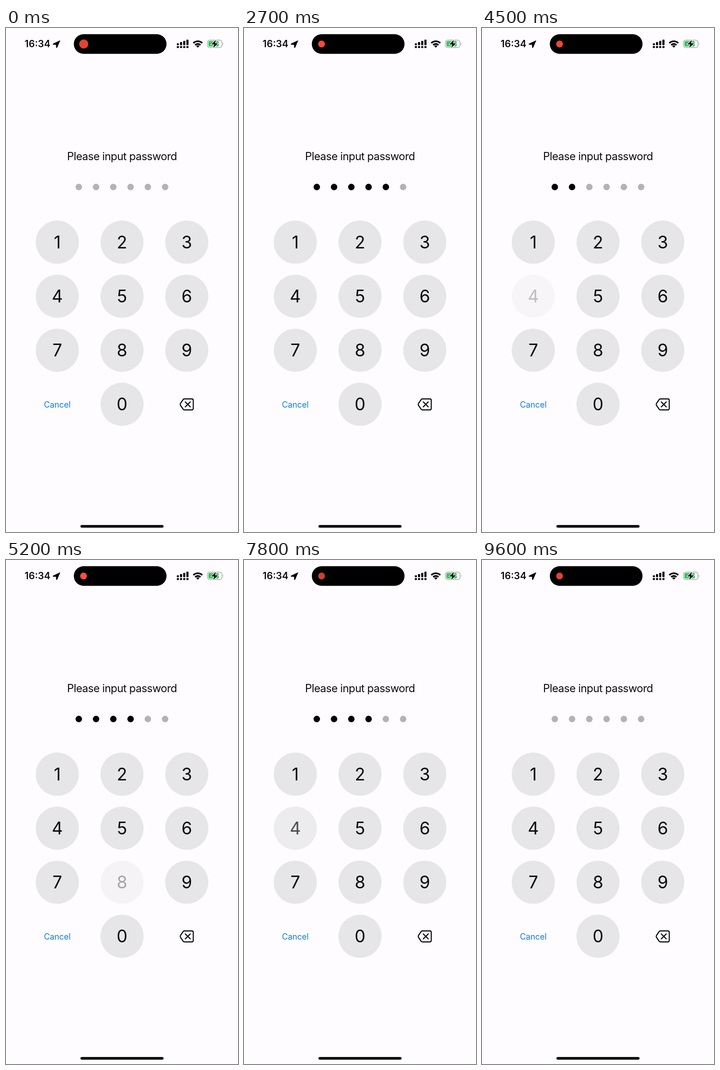
These frames come from a looping animation (508x1102 px, 9.7 s). An HTML page:

```html
<!DOCTYPE html>
<html lang="en">
<head>
<meta charset="utf-8">
<title>Password keypad</title>
<style>
  html, body { margin: 0; width: 100%; height: 100%; overflow: hidden; background: #fefcff; }
  svg { display: block; width: 508px; height: 1102px; }
  text { font-family: Inter, Roboto, sans-serif; text-anchor: middle; fill: #0b0a0c; }
  .title { font-size: 23.6px; letter-spacing: -.55px; }
  .digit { font-size: 37.5px; }
  .cancel { font-size: 18px; letter-spacing: -.1px; fill: #147ade; }
  .clock { font-size: 21px; font-weight: 600; }
</style>
</head>
<body>
<svg viewBox="0 0 508 1102">
  <text class="clock" x="69" y="42.3">16:34</text>
  <path d="M118.2 27.6 L103 34.8 Q102 35.8 103.4 36 L110 36.2 L110.2 42.6 Q110.6 44 111.6 42.8 Z"
        stroke="#000" stroke-width="1" stroke-linejoin="round"/>
  <rect x="148.5" y="13.5" width="203" height="43" rx="21.5"/>
  <circle id="rec" cy="35"/>
  <g id="signal"></g>
  <g fill="none" stroke="#000" stroke-width="3.6">
    <path d="M410.2 33 A14 14 0 0 1 429.8 33"/>
    <path d="M414.2 37.2 A8.3 8.3 0 0 1 425.8 37.2"/>
  </g>
  <path d="M420 43 L416.4 39.4 A5.2 5.2 0 0 1 423.6 39.4 Z"/>
  <rect x="441" y="26.5" width="32" height="16.2" rx="5" fill="none" stroke="#a6a5a8" stroke-width="1.4"/>
  <path d="M474.8 32 Q477 34.6 474.8 37.4 Z" fill="#a6a5a8"/>
  <rect x="443.2" y="28.6" width="22.8" height="12" rx="3" fill="#34c759"/>
  <path d="M459.6 26 L449.6 36 H456 L453.6 43.6 L464.4 33.4 H457.8 Z"
        stroke="#fefcff" stroke-width="2.4" paint-order="stroke" stroke-linejoin="round"/>

  <text class="title" x="254" y="289.3">Please input password</text>
  <g id="dots"></g>
  <g id="keys"></g>

  <text class="cancel" x="112.2" y="829.7">Cancel</text>
  <g fill="none" stroke="#0b0a0c" stroke-width="2.3" stroke-linecap="round" stroke-linejoin="round">
    <path d="M390.5 811 H407 Q410 811 410 814 V832 Q410 835 407 835 H390.5 Q389.2 835 388.2 834 L382 825 Q380.8 823 382 821 L388.2 812 Q389.2 811 390.5 811 Z"/>
    <path d="M392.6 817.6 L403.4 828.4 M403.4 817.6 L392.6 828.4"/>
  </g>
  <rect x="163" y="1086.7" width="182" height="5.8" rx="2.9"/>
</svg>
<script>
const LOOP = 9700, STEP = 100;
const PRESS = 150, RELEASE = 250, CLEAR = 200, SHAKE = 500;

// Each entry: [key, time of release]
const ENTRIES = [
  [[8, 998], [5, 1370], [6, 1730], [9, 2080], [5, 2430], [8, 2850]],
  [[5, 4150], [4, 4480], [7, 4820], [8, 5150], [9, 5500], [6, 5860]],
  [[8, 6680], [5, 7000], [7, 7320], [4, 7635], [5, 7980], [6, 8300]]
];
// Recording light: [time in pulse, r, g, b]
const PULSE_TIME = 2100;
const PULSE = [
  [0, 226, 67, 51], [600, 249, 74, 55], [850, 255, 79, 60], [1000, 255, 78, 60],
  [1200, 224, 67, 48], [1400, 209, 63, 46], [1600, 207, 62, 46], [2100, 226, 67, 51]
];

const $ = id => document.getElementById(id);
const clamp = x => Math.max(0, Math.min(1, x));

function add(parent, tag, attrs, text = "") {
  const el = document.createElementNS("http://www.w3.org/2000/svg", tag);
  for (const k in attrs) el.setAttribute(k, attrs[k]);
  el.textContent = text;
  return parent.appendChild(el);
}

[33.4, 30.8, 28.2, 25.6].forEach((y, i) => {
  const x = 374 + i * 7;
  add($("signal"), "rect", { x, y, width: 4.6, height: 37.4 - y, rx: 1 });
  add($("signal"), "rect", { x, y: 39.4, width: 4.6, height: 4.4, rx: 1 });
});

const dots = Array.from({ length: 6 }, (_, i) =>
  add($("dots"), "circle", { cx: 159.4 + i * 37.8, cy: 347.7, r: 7.1 }));

const keys = Array.from({ length: 10 }, (_, n) => {
  const col = n ? (n - 1) % 3 : 1, row = n ? Math.floor((n - 1) / 3) : 3;
  const x = 112.3 + col * 141.75, y = 468.3 + row * 118.15;
  const g = add($("keys"), "g", {});
  add(g, "circle", { cx: x, cy: y, r: 47.2, fill: "#e6e5e8" });
  add(g, "text", { class: "digit", x, y: y + 13.6 }, n);
  return g;
});

function keyOpacity(t, up) {
  if (t < up) return 1 - .8 * clamp((t - up + PRESS) / 100);
  return .2 + .8 * clamp((t - up) / RELEASE);
}

function pulseColor(t) {
  const p = t % PULSE_TIME;
  const i = PULSE.findIndex(k => k[0] > p);
  const a = PULSE[i - 1], b = PULSE[i];
  const f = (p - a[0]) / (b[0] - a[0]);
  return `rgb(${[1, 2, 3].map(c => Math.round(a[c] + (b[c] - a[c]) * f))})`;
}

function draw(t) {
  const opacity = Array(10).fill(1);
  let filled = 0, shift = 0;
  for (const entry of ENTRIES) {
    const clearAt = entry[5][1] + CLEAR;
    for (const [key, up] of entry) {
      opacity[key] = Math.min(opacity[key], keyOpacity(t, up));
      if (t >= up && t < clearAt) filled++;
    }
    const s = (t - clearAt) / SHAKE;
    if (s > 0 && s < 1) shift = 8 * (1 - s) ** 2 * Math.sin(s * Math.PI * 6);
  }
  keys.forEach((k, n) => k.setAttribute("opacity", opacity[n]));
  dots.forEach((d, i) => d.setAttribute("fill", i < filled ? "#000" : "#b3b2b6"));
  $("dots").setAttribute("transform", `translate(${shift} 0)`);

  const shrink = clamp(t / 400);
  $("rec").setAttribute("cx", 170.2 - .4 * shrink);
  $("rec").setAttribute("r", 10 - 2.6 * shrink);
  $("rec").setAttribute("fill", pulseColor(t));
}

const start = performance.now();
function tick() {
  const t = (performance.now() - start) % LOOP;
  draw(Math.floor(t / STEP) * STEP);
  requestAnimationFrame(tick);
}
tick();
</script>
</body>
</html>
```
